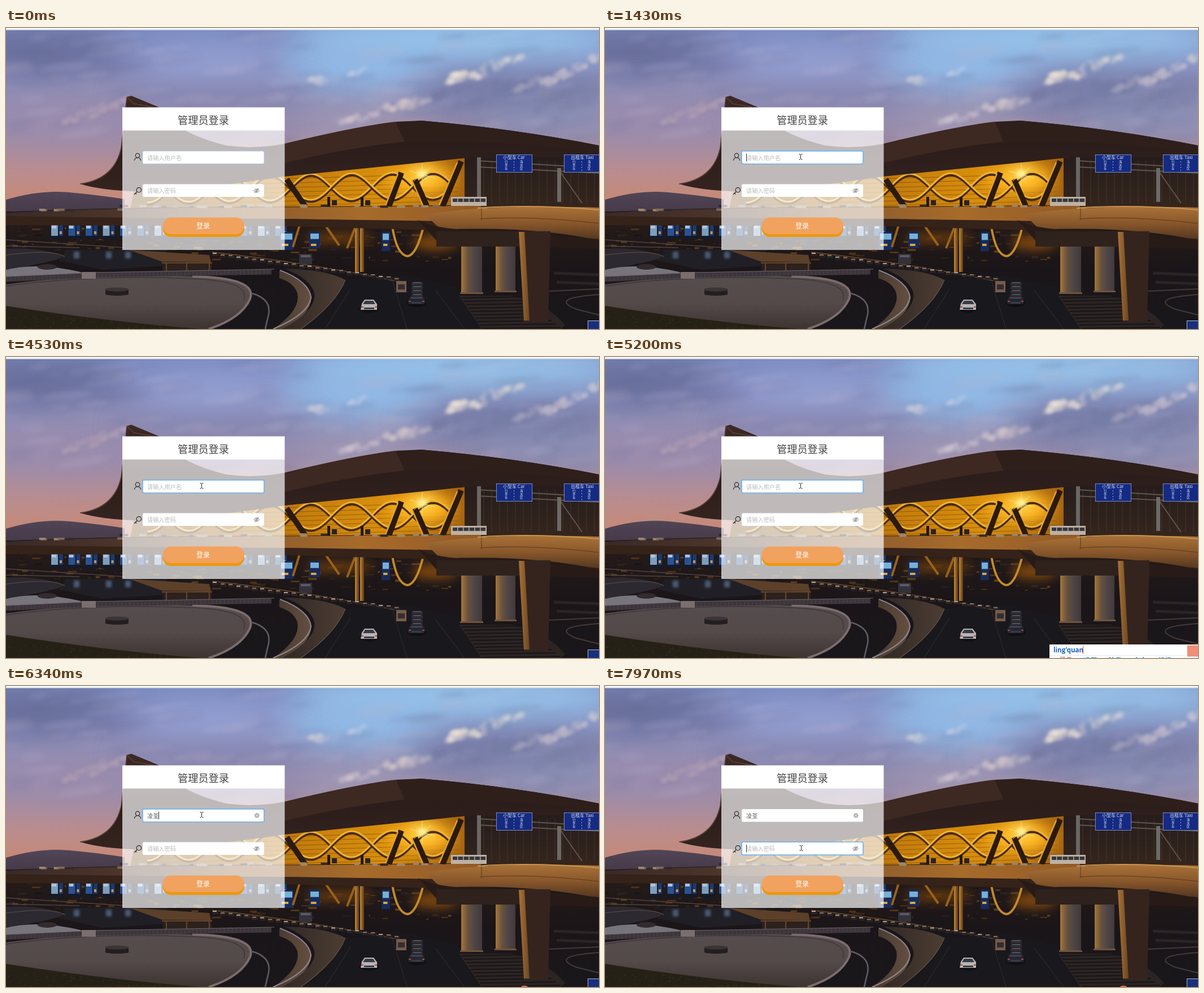
These frames come from a looping animation (1050x533 px, 8000 ms). An HTML page with a canvas:

```html
<!DOCTYPE html>
<html lang="zh-CN">
<head>
<meta charset="utf-8">
<title>管理员登录</title>
<style>
html, body { margin: 0; width: 100%; height: 100%; overflow: hidden; background: #1c181b; }
canvas, svg { position: absolute; left: 0; top: 0; width: 1050px; height: 533px; }
text { font-family: "Noto Sans CJK SC", "Noto Sans CJK", sans-serif; }
.field { fill: #fff; }
.hint { font-size: 10.2px; fill: #bbb; }
.value { font-size: 10.2px; fill: #606266; }
.hover { fill: none; stroke: #a3cdf2; }
.focus { fill: none; stroke: #6bb0ee; stroke-width: 1.2; }
.halo { fill: none; stroke: #409eff; stroke-opacity: .22; stroke-width: 2; }
.icon { fill: none; stroke: #2c2a2c; stroke-width: 1.2; }
.caret { stroke: #333; }
.cand { font-size: 12px; fill: #2b84d6; }

.step { animation: 8s step-end infinite; }
.ease { animation: 8s linear infinite; }
#userHover { animation-name: userHover; }
#userFocus { animation-name: userFocus; }
#passHover { animation-name: passHover; }
#passFocus { animation-name: passFocus; }
#hint { animation-name: hint; }
#typed { animation-name: typed; }
#chosen { animation-name: chosen; }
#clear { animation-name: clear; }
#caretA { animation-name: caretA; }
#caretB { animation-name: caretB; }
#ime { animation-name: ime; }
#imeCaret { animation-name: imeCaret; }
#tip { animation-name: tip; }
#speck { animation-name: speck; }
#mouse { animation-name: mouse; }
#arrow { animation-name: arrow; }
#beam { animation-name: beam; }

@keyframes userHover { 0% { opacity: .8 } 4%, 11.4% { opacity: 0 } 15%, 99% { opacity: 1 } 99.6%, 100% { opacity: 0 } }
@keyframes userFocus { 0% { opacity: 0 } 17.875% { opacity: 1 } 99.125%, 100% { opacity: 0 } }
@keyframes passHover { 0%, 91% { opacity: 0 } 93%, 100% { opacity: 1 } }
@keyframes passFocus { 0% { opacity: 0 } 99.125%, 100% { opacity: 1 } }
@keyframes hint { 0% { opacity: 1 } 65.625%, 100% { opacity: 0 } }
@keyframes typed { 0% { opacity: 0 } 65.625% { opacity: 1 } 79.25%, 100% { opacity: 0 } }
@keyframes chosen { 0% { opacity: 0 } 79.25%, 100% { opacity: 1 } }
@keyframes clear { 0%, 68.3% { opacity: 0 } 72%, 100% { opacity: 1 } }
@keyframes caretA {
  0% { opacity: 0 } 17.875% { opacity: 1 } 21.875% { opacity: 0 } 27.75% { opacity: 1 } 34.375% { opacity: 0 }
  48.625% { opacity: 1 } 56.625% { opacity: 0 } 57.625% { opacity: 1 } 63.75%, 100% { opacity: 0 }
}
@keyframes caretB { 0% { opacity: 0 } 79.25% { opacity: 1 } 86.75% { opacity: 0 } 92.5% { opacity: 1 } 99.125%, 100% { opacity: 0 } }
@keyframes ime {
  0% { opacity: 0; transform: translate(787px, 509px) } 63.8% { opacity: 1; transform: translate(787px, 509px) }
  65.625% { opacity: 1; transform: translate(255px, 235px) } 79.25%, 100% { opacity: 0; transform: translate(255px, 235px) }
}
@keyframes imeCaret { 0% { opacity: 1 } 68.4% { opacity: 0 } 73.4%, 100% { opacity: 1 } }
@keyframes tip { 0%, 68.3% { opacity: 0 } 73.5%, 100% { opacity: 1 } }
@keyframes speck { 0% { opacity: 0 } 65.625%, 100% { opacity: 1 } }
@keyframes mouse {
  0%, 1% { transform: translate(930px, 526px); animation-timing-function: cubic-bezier(.3, .2, .4, 1) }
  10.6% { transform: translate(340px, 243px) } 11.25% { transform: translate(341px, 240px) }
  16%, 86.75% { transform: translate(346px, 228px) } 88.5% { transform: translate(346px, 231px) }
  92%, 100% { transform: translate(347px, 287px) }
}
@keyframes arrow { 0% { opacity: 0 } 1% { opacity: 1 } 11% { opacity: 0 } 89.3% { opacity: 1 } 91.2%, 100% { opacity: 0 } }
@keyframes beam { 0% { opacity: 0 } 11% { opacity: 1 } 89.3% { opacity: 0 } 91.2%, 100% { opacity: 1 } }
</style>
</head>
<body>
<canvas id="scene" width="1050" height="533"></canvas>
<svg viewBox="0 0 1050 533">
  <ellipse id="speck" class="step" cx="918" cy="533" rx="6" ry="2.5" fill="#e8664e"/>

  <rect x="206" y="181" width="287.5" height="212" fill="#fff" fill-opacity=".69"/>
  <rect x="206" y="140.5" width="287.5" height="41" fill="#fff"/>
  <text x="349.5" y="169.5" font-size="18.2" font-weight="350" fill="#444" text-anchor="middle">管理员登录</text>

  <g class="icon">
    <circle cx="233" cy="225.8" r="3.7"/>
    <path d="M227.3 234.8C227.5 227.8 238.5 227.8 238.7 234.8"/>
    <circle cx="235.3" cy="286.8" r="4.2"/>
    <path d="M232.3 289.8L227 294.8M229.5 292.5L231.2 294.3"/>
  </g>

  <rect class="field" x="242" y="218" width="215" height="22.5" rx="2.5"/>
  <rect id="userHover" class="hover ease" x="242" y="218" width="215" height="22.5" rx="2.5"/>
  <g id="userFocus" class="step">
    <rect class="halo" x="241.5" y="217.5" width="216" height="23.5" rx="3"/>
    <rect class="focus" x="242" y="218" width="215" height="22.5" rx="2.5"/>
  </g>
  <text id="hint" class="hint step" x="250" y="233.5">请输入用户名</text>
  <g id="typed" class="step">
    <text class="value" x="250" y="233.5">lingquan</text>
    <path d="M250 235.5H290" stroke="#555" stroke-width=".8"/>
  </g>
  <text id="chosen" class="value step" x="250" y="233.5">凌荃</text>
  <g id="clear" class="ease">
    <circle cx="444.3" cy="229.3" r="4.3" fill="#b3b3b3"/>
    <path d="M442.8 227.8l3 3m0-3l-3 3" stroke="#fff" stroke-width=".9"/>
  </g>
  <path id="caretA" class="caret step" d="M250.5 222.5V236"/>
  <path id="caretB" class="caret step" d="M270.5 222.5V236"/>

  <rect class="field" x="242" y="276.5" width="215" height="22.5" rx="2.5"/>
  <rect id="passHover" class="hover ease" x="242" y="276.5" width="215" height="22.5" rx="2.5"/>
  <text class="hint" x="250" y="292">请输入密码</text>
  <path d="M438.8 288Q443.7 281.5 448.6 288Q443.7 294.5 438.8 288ZM440 292.3L447.6 283.7" fill="none" stroke="#777"/>
  <circle cx="443.7" cy="288" r="1.7" fill="none" stroke="#777" stroke-width=".9"/>
  <g id="passFocus" class="step">
    <rect class="halo" x="241.5" y="276" width="216" height="23.5" rx="3"/>
    <rect class="focus" x="242" y="276.5" width="215" height="22.5" rx="2.5"/>
    <path class="caret" d="M250.5 281V294.5"/>
  </g>

  <rect x="277.5" y="340.5" width="144.5" height="29.5" rx="14.7" fill="#ee980c"/>
  <rect x="277.5" y="335.5" width="144.5" height="29.5" rx="14.7" fill="#f1a25f"/>
  <text x="349" y="354.5" font-size="12" font-weight="350" fill="#fff" text-anchor="middle">登录</text>

  <g id="ime" class="step">
    <rect width="266" height="40" fill="#fff"/>
    <path d="M0 19.5H240" stroke="#e4e8ee"/>
    <text x="7" y="13.8" font-size="11.6" font-weight="700" fill="#1764bd" style="font-family: 'Open Sans', sans-serif">ling'quan</text>
    <path id="imeCaret" class="step" d="M59.5 3V17" stroke="#e04a3c"/>
    <g id="tip" class="ease">
      <circle cx="100.5" cy="10" r="4.6" fill="none" stroke="#ee7b55"/>
      <path d="M100.5 7V13" stroke="#ee7b55" stroke-width="1.2"/>
      <text x="109.5" y="13" font-size="9.3" fill="#2a6fbd">工具箱(分号)</text>
    </g>
    <g class="cand">
      <text x="7" y="33.3" fill="#c8402f">1.灵泉</text><text x="50.5" y="33.3">2.凌荃</text>
      <text x="94" y="33.3">3.铃泉</text><text x="138" y="33.3">4.令全</text><text x="182" y="33.3">5.领权</text>
    </g>
    <g fill="none" stroke="#e0533f" stroke-width="1.5">
      <path d="M233.5 26.5L230 30L233.5 33.5" stroke="#ccc"/>
      <path d="M240.5 26.5L244 30L240.5 33.5M252 28.5L255.3 31.8L258.6 28.5"/>
    </g>
    <rect x="244" y="1.5" width="20" height="20" fill="#f08f76"/>
  </g>

  <g id="mouse" class="ease">
    <path id="arrow" class="step" d="M0 0V15L3.5 12L6 17.5L8.3 16.5L6 11.2H10.5Z" fill="#fff" stroke="#222" stroke-width=".8"/>
    <path id="beam" class="step" d="M-2.5 -4.5H-.5L.5 -3.5L1.5 -4.5H3.5M.5 -4V4M-2.5 4.5H-.5L.5 3.5L1.5 4.5H3.5" fill="none" stroke="#222"/>
  </g>
</svg>

<script>
const ctx = document.getElementById('scene').getContext('2d');
let seed = 7;
const rnd = (a = 0, b = 1) => {
  seed = (seed * 16807) % 2147483647;
  return a + (b - a) * seed / 2147483647;
};
const pick = list => list[Math.floor(rnd(0, list.length))];
const fill = (color, d) => { ctx.fillStyle = color; ctx.fill(new Path2D(d)); };
const line = (color, width, d) => { ctx.strokeStyle = color; ctx.lineWidth = width; ctx.stroke(new Path2D(d)); };
const box = (color, x, y, w, h) => { ctx.fillStyle = color; ctx.fillRect(x, y, w, h); };
const oval = (color, x, y, rx, ry, turn = 0) => {
  ctx.fillStyle = color;
  ctx.beginPath();
  ctx.ellipse(x, y, rx, ry, turn, 0, 7);
  ctx.fill();
};
const grad = (x0, y0, x1, y1, ...colors) => {
  const g = ctx.createLinearGradient(x0, y0, x1, y1);
  colors.forEach((c, i) => g.addColorStop(i / (colors.length - 1), c));
  return g;
};
const soft = (radius, draw) => { ctx.filter = `blur(${radius}px)`; draw(); ctx.filter = 'none'; };

// a cloud bank: small puffs scattered along a slanted ellipse
function cloud(color, x, y, rx, ry, slope = 0) {
  ctx.globalAlpha = .4;
  for (let i = 0; i < rx * .6; i++) {
    const u = rnd(-1, 1), v = rnd(-1, 1) * Math.sqrt(1 - u * u);
    oval(color, x + u * rx, y + v * ry + u * rx * slope, rnd(3, 9), rnd(2, 5), slope);
  }
  ctx.globalAlpha = 1;
}

function sky() {
  box(grad(0, 0, 0, 315, '#7b8cc2', '#878dbe', '#918fb5', '#a08ca6', '#b98d90', '#c98872'), 0, 0, 1050, 330);
  soft(28, () => {
    oval('#696e9a', 60, 40, 150, 42);
    oval('#98c6ec', 800, 20, 300, 42);
    oval('#92beea', 620, 70, 150, 36);
    oval('#96a4d6', 370, 70, 130, 35);
    oval('#9a8cae', 110, 160, 160, 36);
    oval('#8583ae', 380, 130, 170, 30);
    oval('#737ba6', 890, 120, 170, 34);
    oval('#8d93b8', 980, 165, 150, 26);
    oval('#a19db9', 620, 175, 130, 18);
  });
  soft(4, () => {
    for (let i = 0; i < 150; i++) {
      ctx.globalAlpha = rnd(.06, .2);
      oval(pick(['#bdbbdb', '#62688f', '#c3b5c8', '#777ca8']), rnd(0, 1050), rnd(10, 200), rnd(15, 50), rnd(3, 8), -.12);
    }
    ctx.globalAlpha = 1;
  });
  soft(3, () => {
    cloud('#747aa3', 850, 112, 90, 18, -.1);
    cloud('#7d81a8', 990, 125, 70, 18, -.2);
    cloud('#eee2d8', 848, 73, 66, 9, -.34);
    cloud('#f5e9dc', 815, 86, 34, 9, -.05);
    cloud('#dcd3d6', 1000, 74, 60, 9, -.5);
    cloud('#b9b3c8', 945, 96, 45, 9, -.3);
    cloud('#e0d2d0', 705, 136, 46, 9, -.2);
    cloud('#cfc6d2', 622, 160, 36, 5, -.2);
    cloud('#e9e1e2', 552, 92, 15, 5);
    cloud('#d5d9ec', 622, 78, 13, 4, -.4);
    cloud('#bfabbc', 160, 147, 58, 8, -.35);
  });
  fill(grad(0, 288, 0, 325, '#514657', '#473a49'), 'M0 304Q60 286 112 291Q165 296 210 303V330H0Z');
}

function terminal() {
  // gilded hall
  fill(grad(240, 0, 812, 0, '#7c5529', '#a56612', '#c57d0c', '#d98f0c', '#a36210'), 'M230 270L493 240L815 215V320H220Z');
  for (let y = 258; y < 315; y += 8) line('#704508', .6, `M240 ${y + 16}L800 ${y}`);
  soft(12, () => { oval('#ffb41e', 735, 268, 60, 26); oval('#ffda58', 738, 259, 22, 15); });
  const wave = (phase, shift) => {
    let d = '';
    for (let x = 250; x <= 790; x += 5) {
      const y = 287 - (x - 250) * .016 - 23 * Math.cos((x - phase) * Math.PI / 72);
      d += `${d ? 'L' : 'M'}${x} ${y + shift}`;
    }
    return d;
  };
  for (const phase of [540, 612]) {
    line('#4a2b0b', 5, wave(phase, 2));
    line('#eeb538', 3, wave(phase, -1));
  }
  line('#2b1a0e', 10, 'M806 236L773 316M700 256L678 316M724 268L745 315M497 268L530 316');
  line('#e0a12c', 2.5, 'M799 238L767 314M694 258L672 314M719 270L738 314');
  soft(3, () => oval('#fff3a0', 737, 259, 9, 7));
  line('#ffe98acc', 1, 'M737 240V280M715 253L760 266M722 271L752 247');

  // roof
  box(grad(0, 225, 0, 320, '#251c1c', '#35261d'), 812, 215, 238, 104);
  fill(grad(0, 120, 0, 295, '#3d2924', '#2b1d1b', '#35241f'),
    'M131 276Q192 268 204 212L214 122L222 120L270 140Q300 186 390 208Q440 215 493 205Q620 174 735 164Q900 178 1050 208V229L826 229Q690 243 493 263L300 290Q180 292 131 276Z');
  fill('#3d2822', 'M493 205Q620 174 690 166L706 201Q600 213 493 239Z');
  fill('#2e1f1b', 'M690 166L735 164Q900 178 1050 208V219Q840 196 706 201Z');
  line('#5a403a', 1.5, 'M214 122L226 134L260 140M131 276Q192 268 204 212L214 122');
  for (let x = 846; x < 1050; x += 14) line('#5b4a3a', .5, `M${x} 235V310`);
  line('#5f554b', 2, 'M835 235L1050 248M835 246L1050 257M978 250L1020 310');
  box('#6a6663', 834, 229, 7, 88);
  box('#6d6966', 976, 248, 7, 60);
}

function sign(x, label) {
  box('#a9b7dc', x, 224, 64, 32);
  box('#152a82', x + .7, 224.7, 62.6, 30.6);
  ctx.fillStyle = '#dbe3f4';
  ctx.font = '8px "Noto Sans CJK SC", sans-serif';
  ctx.fillText(label, x + 12, 232);
  ctx.font = '5.5px "Noto Sans CJK SC", sans-serif';
  ['行李车', '海关区'].forEach((word, i) =>
    [...word].forEach((c, j) => ctx.fillText(c, x + 15 + i * 27, 239 + j * 6)));
  for (let y = 236; y < 252; y += 5) box('#a9b9e0', x + 31, y, 1, 2);
}

function underDeck() {
  box(grad(0, 325, 0, 533, '#271c19', '#1a1518', '#19171b'), 0, 325, 1050, 208);
  for (let i = 0; i < 230; i++) {
    const x = rnd(0, 800), y = rnd(348, 412);
    box(pick(['#35251a', '#4d3117', '#151316', '#2d231f', '#5c3d18']), x, y, rnd(2, 16), rnd(1, 4));
  }
  soft(9, () => { oval('#7a450f', 760, 380, 40, 14); oval('#63390f', 590, 372, 60, 10); });
  for (let x = 80, i = 0; x < 490; x += 30.5, i++) {
    box('#171925', x - 2, 343, 25, 32);
    box(i % 3 ? '#2a5293' : '#7d9dbd', x, 346, 12, 22);
    box('#b2c4d6', x + 1, 350, 8, 5);
    box('#1d396b', x + 14, 347, 7, 21);
    box('#b9946c', x + 15, 360, 4, 5);
  }
  for (const [x, w, h] of [[485, 24, 32], [537, 19, 29], [665, 15, 34]]) {
    box('#182b5b', x, 361, w, h);
    box('#78b0d6', x + 2, 364, w - 4, h / 3);
    box('#d8a743', x + 3, 382, w / 2, 4);
  }
  for (const x of [618, 627]) box(grad(x, 0, x + 8, 0, '#c78b31', '#452b17'), x, 350, 7, 82);
  line('#9a6219', 4, 'M520 349L508 388M565 349L590 385M620 349L604 390');
  line('#c48a2b', 4, 'M684 352Q692 402 711 404Q727 402 739 352');
}

function deck() {
  fill(grad(0, 0, 840, 0, '#382a28', '#4d352a', '#8a5a2e', '#a76b2a', '#935a26'), 'M0 327Q250 315 500 318L840 315V343L493 338Q250 339 0 334Z');
  fill('#35231a', 'M0 333Q250 337 493 338L760 343L790 359L500 351L0 349Z');
  line('#1d171b', 1, 'M0 326Q240 316 500 317L840 314');
  fill(grad(0, 315, 0, 378, '#ab7339', '#87562a', '#4d3320'), 'M742 330Q850 312 1050 318V376Q930 350 770 357Z');
  fill('#281b17', 'M730 340Q770 360 850 357L1050 374V391L768 383Z');
  line('#c99450', 2, 'M835 319Q930 312 1050 322');
  line('#5c381d', 1, 'M840 338Q930 332 1050 346M842 319V340');
  for (let i = 0; i < 34; i++) {
    const x = rnd(45, 770);
    box(pick(['#7b685c', '#9b8471', '#33272a', '#a1885e']), x, 314 + rnd(0, 3) + (x < 200 ? 4 : -2), rnd(7, 15), 4);
  }
  box('#bdb2a4', 788, 299, 63, 16);
  box('#38373c', 791, 302, 58, 6);
  for (let x = 799; x < 850; x += 10) box('#b5a797', x, 301, 1.5, 8);
  for (const x of [569, 628]) { box('#20191b', x, 299, 5, 17); box('#2b2222', x + 8, 305, 9, 9); }
}

function ground() {
  fill('#77747c', 'M0 428Q55 414 132 432L138 438L0 443Z');
  fill('#2c2930', 'M0 391Q60 387 105 405Q70 418 0 427Z');
  fill('#201f25', 'M105 393L285 392V421L170 428L96 412Z');
  line('#4f423f', 1.5, 'M0 375L210 389M0 386L130 389M0 402Q80 391 104 405');
  soft(2, () => { for (const x of [120, 177, 211]) box('#4a5a74', x, 396, 10, 12); });
  fill('#5c4029', 'M218 393L360 402L363 415L277 414Z');
  box('#2c211d', 278, 417, 86, 20);
  line('#7d542d', 1.5, 'M276 416H365M284 417V438M320 417V438M360 417V438');
  oval('#322a2d', 73, 423, 17, 5);

  // round plaza
  fill(grad(0, 440, 0, 533, '#554c4d', '#544a4a', '#3d3431'), 'M0 454Q150 433 340 440Q450 445 431 482Q416 514 365 533H0Z');
  line('#7b6c6d', 4, 'M330 440Q447 442 432 480Q417 514 359 533');
  line('#403638', 1.5, 'M0 457Q150 436 330 444Q434 448 421 482');
  line('#3c353b', 9, 'M0 445L160 437L470 432');
  line('#71666b', 1, 'M0 440L160 433L475 427');
  for (let x = 2; x < 470; x += 7) line('#5c5259', .5, `M${x} ${440 - x * .028}v8`);
  box('#7a6e6e', 134, 432, 25, 12);
  box('#231e21', 176, 463, 41, 8);
  oval('#3d3535', 196.5, 463, 21, 3.5);
  oval('#231e21', 196.5, 471, 21, 3);
  fill('#262116', 'M0 492Q180 520 345 533H0Z');
  for (let i = 0; i < 150; i++) {
    const x = rnd(0, 290);
    box(pick(['#3c301c', '#2f281e', '#1f1c17']), x, rnd(500 + x * .1, 533), 3, 1);
  }

  // ramps and road
  fill(grad(484, 0, 541, 0, '#4a3b30', '#655040'), 'M484 430Q537 451 541 477Q538 511 489 533H473Q522 500 516 470Q510 451 484 443Z');
  line('#8d8692', 2, 'M485 429Q537 449 540 477Q536 507 473 533');
  line('#625d67', 2.5, 'M436 470Q470 480 465 507L459 533');
  fill(grad(480, 0, 600, 0, '#2e2624', '#4c3d33'), 'M492 426Q565 427 601 446Q585 488 523 533H489Q551 499 546 469Q538 443 492 426Z');
  line('#615346', 1.2, 'M601 446Q584 489 522 533');
  fill('#19181d', 'M602 446L710 438L800 460L835 533H528Q585 493 602 446Z');
  line('#322e30', 1, 'M685 450L710 533M610 462L565 533M760 464L812 533');
  line('#6c4b2c', 1.5, 'M365 397Q530 415 690 448');
  for (let i = 0; i < 24; i++) {
    const x = 365 + i * 14, y = 398 + i * 1.9 + (i % 2);
    box('#282227', x, y, 11, 6);
    box(i % 3 ? '#8f7655' : '#b8a88f', x + 1, y, 7, 2);
  }
  fill('#2c2423', 'M802 474L895 474Q960 489 990 526L982 533H842Z');
  for (let i = 0; i < 10; i++) line('#171517', 2, `M${807 + i * 4} ${478 + i * 6}L${910 + i * 8} ${476 + i * 6}`);
  line('#453a37', 2, 'M960 466L1050 462M1050 472Q960 478 1010 498L1050 508');
  line('#2b2424', 5, 'M970 434L1050 437M975 450L1050 453');
}

function pillar(x, y, w, h) {
  box(grad(x, 0, x + w, 0, '#a5763a', '#66513f', '#4c4446', '#43393a'), x, y, w, h);
  box('#70533a', x - 2, y + h - 3, w + 4, 3);
}

function foreground() {
  box('#2f221d', 762, 360, 150, 27);
  pillar(806, 387, 37, 84);
  pillar(867, 387, 35, 81);
  fill('#35241e', 'M908 360H964L960 520H917Z');
  fill(grad(908, 0, 927, 0, '#a97336', '#6b4624'), 'M908 361H918L927 518H917Z');
  // cars
  const car = (x, y, body, glass) => {
    oval('#101014', x, y + 7, 17, 6);
    fill(body, `M${x - 15} ${y + 8}L${x - 13} ${y - 3}L${x - 8} ${y - 10}H${x + 8}L${x + 14} ${y - 2}V${y + 8}Z`);
    fill(glass, `M${x - 11} ${y - 2}L${x - 7} ${y - 8}H${x + 7}L${x + 11} ${y - 2}Z`);
    box('#3b3a42', x - 9, y + 4, 18, 3);
    box('#b34832', x - 14, y + 2, 4, 2);
    box('#b34832', x + 10, y + 2, 4, 2);
  };
  car(643, 491, '#b9b5b6', '#383b46');
  car(727, 481, '#232733', '#484a55');
  for (let y = 450; y < 474; y += 7) { box('#2c2c36', 718, y, 20, 6); box('#6b6060', 721, y, 14, 1.5); }
  box('#755c4a', 691, 448, 18, 20);
  box('#342c31', 694, 454, 12, 9);
  box('#33313a', 519, 400, 23, 18);
  box('#5d5a63', 522, 402, 17, 4);
  sign(868, '小型车 Car');
  sign(988, '出租车 Taxi');
  box('#a9b7dc', 1030, 518, 20, 15);
  box('#182f7c', 1031, 519, 19, 14);
  box('#fafafa', 0, 0, 1050, 3);
  box('#c2d3dc', 0, 2.5, 1050, 1.5);
}

[sky, terminal, underDeck, deck, ground, foreground].forEach(draw => draw());
</script>
</body>
</html>
```
